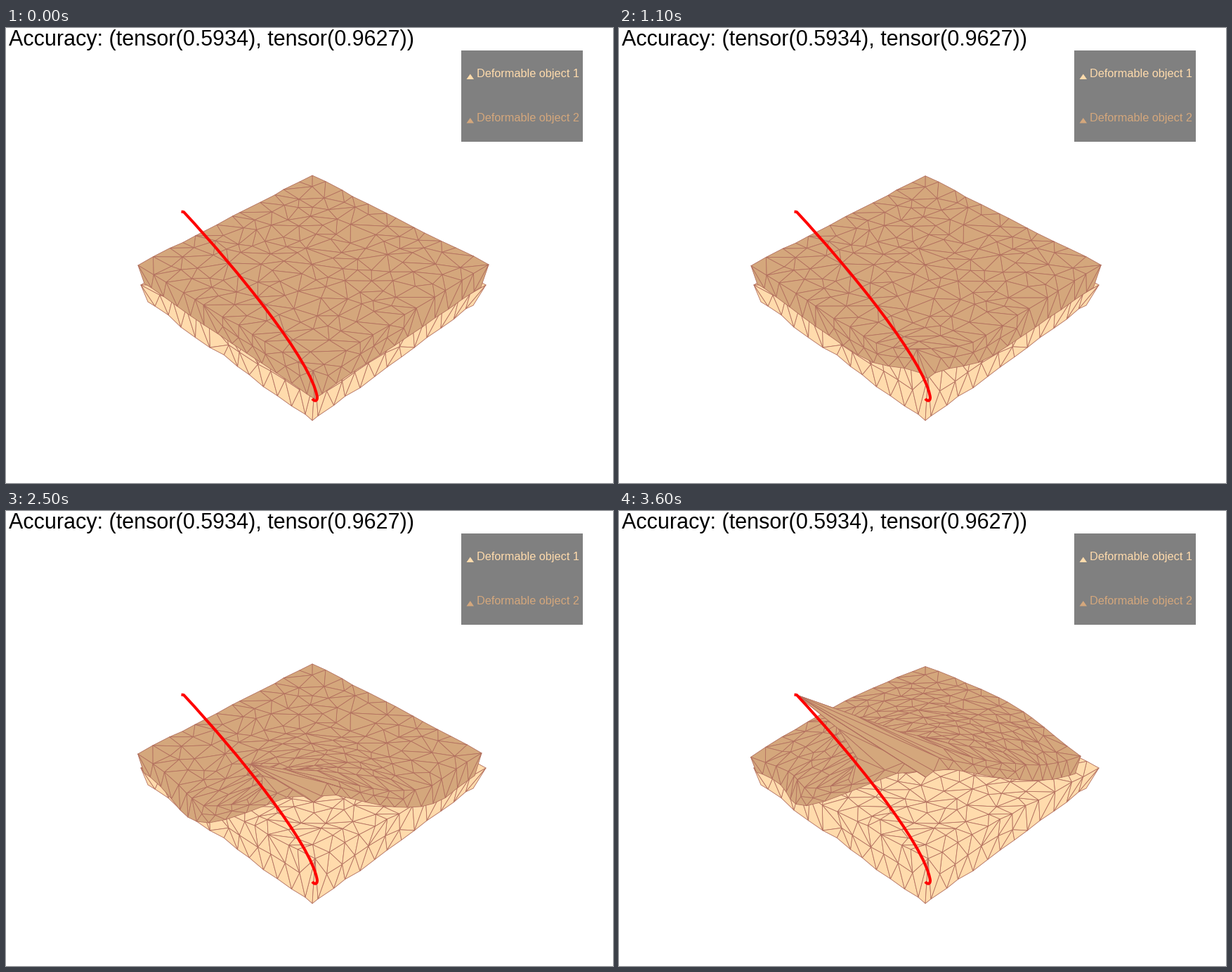
Animation, 864 px wide and 648 px high, one loop 3.7 s. Source, as a matplotlib script:

```python
import numpy as np
import matplotlib.pyplot as plt
from matplotlib.animation import FuncAnimation
from matplotlib.collections import PolyCollection
from matplotlib.patches import PathPatch, Polygon, Rectangle
from matplotlib.path import Path
from matplotlib.tri import Triangulation

W, H = 864, 648
FRAMES, STEP = 37, 100
CREAM, TAN, EDGE = "#ffdbac", "#d4a77c", "#b3705f"
WALL = 1.14  # parameter value at the foot of the front walls
CELLS = 12


def homography(quad):
    """Map of the unit square onto corners back, left, right, front."""
    rows, rhs = [], []
    for (u, v), (x, y) in zip([(0, 0), (1, 0), (0, 1), (1, 1)], quad):
        rows += [[u, v, 1, 0, 0, 0, -x * u, -x * v],
                 [0, 0, 0, u, v, 1, -y * u, -y * v]]
        rhs += [x, y]
    m = np.append(np.linalg.solve(rows, rhs), 1).reshape(3, 3)

    def project(u, v):
        q = m @ np.stack([u, v, np.ones_like(u)])
        return (q[:2] / q[2]).T
    return project


def slab(quad, drops, seed, rough):
    """Irregular mesh of a slab's top and two front walls, in pixels."""
    rng = np.random.default_rng(seed)
    g = np.arange(CELLS + 1) / CELLS
    u, v = (a.ravel() for a in np.meshgrid(g, g))
    du, dv = rng.uniform(-0.3, 0.3, (2, u.size)) / CELLS
    u = u + du * ((u > 0) & (u < 1))
    v = v + dv * ((v > 0) & (v < 1))

    # the walls grow taller towards the front, so a middle row starts halfway
    foot = np.append(0, g[:-1] + 0.5 / CELLS)
    mid = g[CELLS // 2:-1] + rng.uniform(-0.2, 0.2, CELLS - CELLS // 2) / CELLS
    along = np.concatenate([foot, mid])
    down = np.repeat([WALL, (1 + WALL) / 2], [foot.size, mid.size])
    u = np.concatenate([u, down, along, [WALL]])
    v = np.concatenate([v, along, down, [WALL]])

    cu, cv = np.minimum(u, 1), np.minimum(v, 1)
    depth = (np.maximum(u, v) - 1).clip(0) / (WALL - 1)
    left, right, front = np.array(drops, float)
    drop = np.where((u >= v)[:, None],
                    left + (front - left) * cv[:, None],
                    right + (front - right) * cu[:, None])
    pts = homography(quad)(cu, cv) + depth[:, None] * drop
    corner = np.isin(u, [0, 1, WALL]) & np.isin(v, [0, 1, WALL])
    pts += rng.uniform(-rough, rough, pts.shape) * ~corner[:, None]
    return pts, Triangulation(u, v).triangles, depth > 0


def bezier(ctrl, t):
    a, b, c, d = np.array(ctrl, float)
    s = 1 - t
    return s**3 * a + 3 * s**2 * t * b + 3 * s * t**2 * c + t**3 * d


def distance(pts, centre):
    return np.linalg.norm(pts - np.array(centre), axis=1)


def bump(pts, centre, radius):
    return np.exp(-(distance(pts, centre) / radius) ** 2)[:, None]


CORNER = (437, 488)
TRACK = [(253, 262), (330, 345), (435, 474), (443, 526)]

base, base_tris, _ = slab([(436, 240), (192, 366), (683, 366), (440, 495)],
                          [(10, 24), (-18, 29), (-4, 64)], 4, 2.2)
top, tris, is_wall = slab([(436, 210), (188, 338), (687, 337), CORNER],
                          [(9, 26), (-11, 32), (2, 40)], 11, 1.0)

reach = distance(top, (438, 510))
left_fold = bump(top, (325, 445), 80)
right_end = bump(top, (687, 340), 90)
tip = distance(top, CORNER).argmin()
grip = (1 - distance(top, CORNER) / 85).clip(0) ** 2 * ~is_wall
tris = tris[np.argsort(top[tris, 1].mean(1) + 400 * grip[tris].max(1))]


def shape(p):
    """Upper slab when its front corner is pulled back by a share p."""
    ease = p * p * (3 - 2 * p)
    pts = top + [0, 13 * ease**2]
    # the peeled area widens from the corner
    lift = (1 - reach / (310 * p + 1e-6)).clip(0) ** 1.4
    pts[:, 1] -= 178 * ease * lift
    pts += ease**2 * left_fold * [-55, 40] + p**3 * right_end * [-30, 0]
    # the gripped corner follows the red track
    q = p**1.4
    goal = bezier(TRACK, 1 - q) + (1 - q) * np.subtract(CORNER, TRACK[-1])
    return pts + grip[:, None] * (goal - pts[tip])


fig = plt.figure(figsize=(W / 72, H / 72), dpi=72, facecolor="white")
ax = fig.add_axes([0, 0, 1, 1])
ax.set(xlim=(0, W), ylim=(H, 0))
ax.axis("off")


def add_mesh(verts, color, z):
    mesh = PolyCollection(verts, facecolors=color, edgecolors=EDGE,
                          linewidths=0.85, joinstyle="round", zorder=z)
    ax.add_collection(mesh, autolim=False)
    return mesh


add_mesh(base[base_tris], CREAM, 1)
sheet = add_mesh(top[tris], TAN, 2)

track = Path([(249.5, 261.5), *TRACK, (443, 532), (439, 532), (436, 528)],
             [Path.MOVETO, Path.LINETO] + [Path.CURVE4] * 6)
ax.add_patch(PathPatch(track, fill=False, ec="red", lw=4,
                       capstyle="butt", joinstyle="round", zorder=3))

ax.text(4, 25, "Accuracy: (tensor(0.5934), tensor(0.9627))",
        family="Liberation Sans", size=30.5, color="black", va="baseline")
ax.add_patch(Rectangle((648, 32), 173, 130, fc="#808080", ec="none"))
for k, color in enumerate([CREAM, TAN]):
    y = 70 + 62.5 * k
    ax.add_patch(Polygon([(655.5, y + 3), (666, y + 3), (660.8, y - 4.5)],
                         fc=color, ec="none", zorder=3))
    ax.text(669.5, y, f"Deformable object {k + 1}", family="Liberation Sans",
            size=16.2, color=color, va="baseline")


def draw(i):
    sheet.set_verts(shape(i / (FRAMES - 1))[tris])
    return (sheet,)


anim = FuncAnimation(fig, draw, frames=FRAMES, interval=STEP, repeat=True,
                     repeat_delay=0)
plt.show()
```
